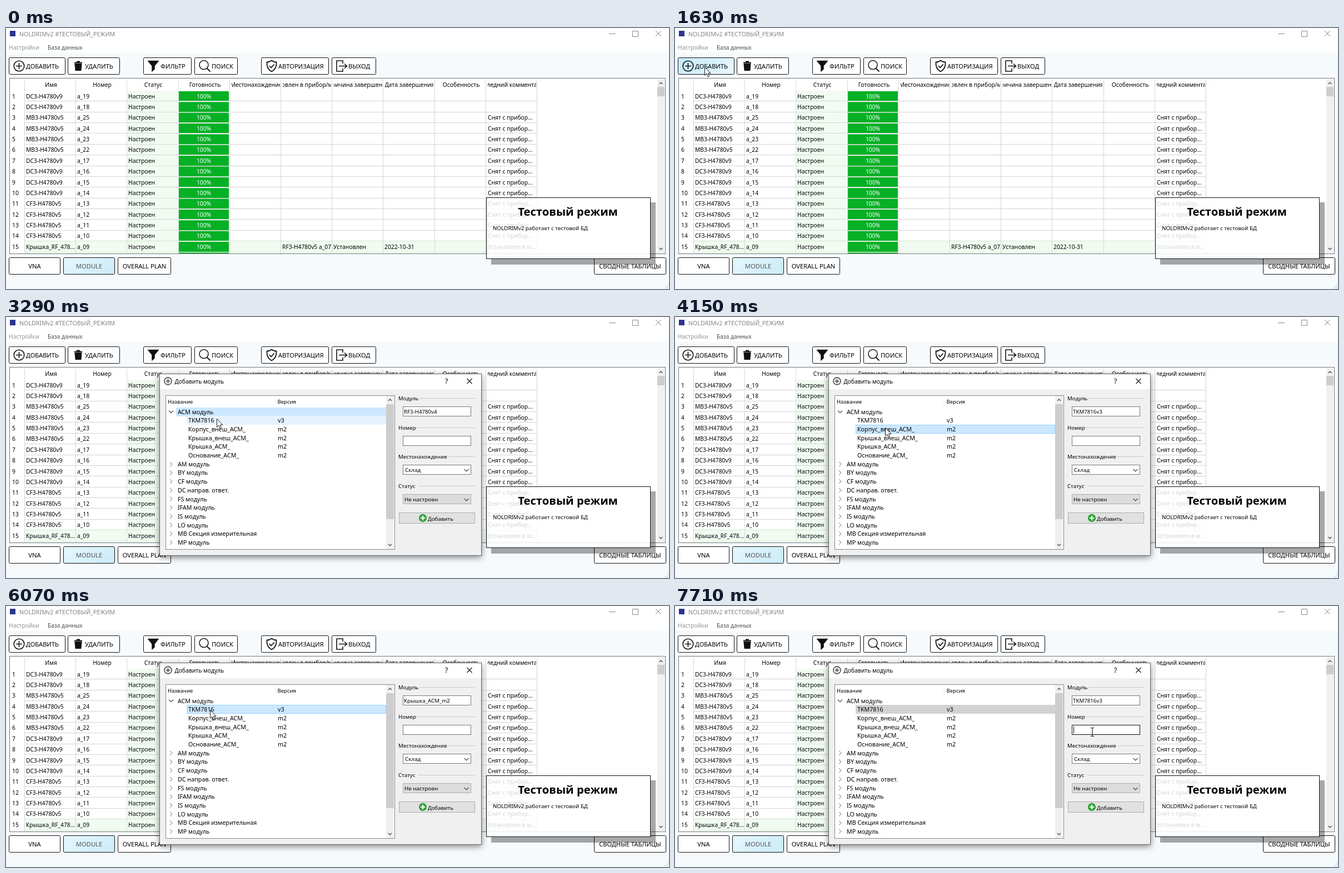
An HTML page that plays this animation: 1193x470 px, repeating every 8000 ms.

```html
<!DOCTYPE html>
<html lang="ru">
<head>
<meta charset="utf-8">
<title>Добавить модуль</title>
<style>
html, body { margin: 0; width: 100%; height: 100%; overflow: hidden; background: #fff; }
svg.stage { display: block; width: 1193px; height: 470px; font-family: "Noto Sans", "Open Sans", sans-serif; white-space: pre; cursor: default; }
.dialog { filter: drop-shadow(0 3px 6px #0007); }
</style>
</head>
<body>
<svg class="stage" viewBox="0 0 1193 470">
  <defs>
    <linearGradient id="glow" x2="1" y2=".4"><stop stop-color="#c3e9f8"/><stop offset="1" stop-color="#e3f6fd"/></linearGradient>
    <linearGradient id="tab" x2="1" y2=".4"><stop stop-color="#e6f8fd"/><stop offset="1" stop-color="#cfedf9"/></linearGradient>
    <clipPath id="table"><rect x="6" y="91" width="1181" height="315"/></clipPath>
    <clipPath id="tree"><rect x="288" y="142" width="411" height="276"/></clipPath>
  </defs>
  <g id="window"></g>
  <g id="hover"></g>
  <g id="notice"></g>
  <g id="dialog"></g>
  <g id="pointer"></g>
</svg>
<script>
const LOOP = 8000, APP = 'NOLDRIMv2';
const layer = id => document.getElementById(id);
const text = (x, y, s, size = 10.3, fill = '#000', more = '') =>
  `<text x="${x}" y="${y}" font-size="${size}" fill="${fill}" ${more}>${s}</text>`;
const centered = (x, y, s, size, fill, more = '') => text(x, y, s, size, fill, 'text-anchor="middle" ' + more);
const box = (x, y, w, h, fill, stroke = 'none', more = '') =>
  `<rect x="${x}" y="${y}" width="${w}" height="${h}" fill="${fill}" stroke="${stroke}" ${more}/>`;
const line = (d, stroke = '#000', width = 1, fill = 'none', more = '') =>
  `<path d="${d}" stroke="${stroke}" stroke-width="${width}" fill="${fill}" ${more}/>`;
const button = (x, y, w, fill = '#fff') => box(x + .5, y + .5, w, 30, fill, '#111', 'rx="2"');

function scrollbar(x, w, top, bottom, thumbTop, thumbBottom) {
  const c = x + w / 2;
  return box(x, top, w, bottom - top, '#f0f0f0')
    + box(x, thumbTop, w, thumbBottom - thumbTop, '#cdcdcd')
    + line(`M${c - 3} ${top + 9}l3 -3 3 3M${c - 3} ${bottom - 9}l3 3 3 -3`, '#505050', 1.4);
}

// ---- main window ----
const colX = i => Math.round(33 + 92.2 * i) + .5;
const rowY = i => 113 + 19.37 * i;

function tableRows() {
  const groups = [['DC3-H4780v9', 2, 19], ['MB3-H4780v5', 4, 25], ['DC3-H4780v9', 4, 17], ['CF3-H4780v5', 4, 13]];
  const rows = groups.flatMap(([name, n, first]) => Array.from({ length: n }, (_, i) => [name, 'a_' + (first - i)]));
  rows.push(['Крышка_RF_478...', 'a_09'], ['', '']);
  let s = '';
  rows.forEach(([name, number], i) => {
    const y = rowY(i), base = y + 13.6, tinted = i >= 14;
    s += box(tinted ? 33 : 218, y, tinted ? 922 : 91, 19.4, '#f1fbf1');
    s += box(310, y + .8, 91, 18, '#06b025');
    s += line(`M33 ${Math.round(y + 19.37) - .5}H955`, i >= 13 ? '#cfe6cf' : '#d3d3d3');
    if (!name) return;
    s += text(11, base, i + 1) + text(36, base, name) + text(128, base, number) + text(220, base, 'Настроен');
    s += centered(356, base, '100%', 10.3, '#fff');
    if (i > 1) s += text(867, base, i < 14 ? 'Снят с прибор...' : 'Установлен в м...');
  });
  const base = rowY(14) + 13.6;
  return s + text(497, base, 'RF3-H4780v5 a_07') + text(589, base, 'Установлен') + text(681, base, '2022-10-31');
}

function tableHeader() {
  const titles = ['Имя', 'Номер', 'Статус', 'Готовность', 'Местонахождение', 'Установлен в прибор/модуль',
    'Причина завершения', 'Дата завершения', 'Особенность', 'Последний комментарий'];
  return titles.map((s, i) => `<svg x="${colX(i) + 3.5}" y="92" width="87" height="20">${centered(44, 14, s)}</svg>`).join('')
    + titles.concat('').map((_, i) => line(`M${colX(i)} 94V406`, i == 2 || i == 3 ? '#cfe3cf' : '#d6d6d6')).join('');
}

function drawWindow() {
  let s = box(0, 0, 1193, 470, '#fff') + box(0, 44, 1193, 426, '#f6fafd');
  s += box(7, 5, 10, 10, '#2a3390') + text(24, 14.5, APP + ' #ТЕСТОВЫЙ_РЕЖИМ', 10.7, '#858585');
  s += line('M1085 10.5h12M1127.5 5.5h10v10h-10zM1169 5l10 10m0 -10l-10 10', '#888');
  s += text(5, 38.5, 'Настройки', 10.3, '#929292') + text(75, 38.5, 'База данных', 10.1, '#4c4c4c');

  [[5, 101, 36, 'ДОБАВИТЬ'], [111, 93, 142, 'УДАЛИТЬ'], [247, 86, 278, 'ФИЛЬТР'], [339, 77, 370, 'ПОИСК'],
   [459, 121, 490, 'АВТОРИЗАЦИЯ'], [586, 79, 616, 'ВЫХОД']].forEach(([x, w, tx, label], i) => {
    s += button(x, 53, w, '#fff').replace('<rect', i ? '<rect' : '<rect id="add"') + text(tx, 72.8, label, 11.1);
  });
  s += '<circle cx="23.5" cy="68.5" r="9.3" fill="none" stroke="#111" stroke-width="1.6"/>' + line('M18 68.5h11M23.5 63v11', '#111', 1.6);
  s += line('M123 62.5h14M127 60.5h6M124.5 65h11l-1 11h-9z', '#111', 2, '#111');
  s += line('M256 59.5h18l-7 8.5v6l-4 3.5v-9.5z', '#111', 1.5, '#111');
  s += '<circle cx="356" cy="66.5" r="8" fill="none" stroke="#111" stroke-width="1.5"/>' + line('M361.5 72.5l6 6', '#111', 1.8);
  s += line('M478 58.5q4 3 8.5 3q1 12 -8.5 17q-9.5 -5 -8.5 -17q4.5 0 8.5 -3zM474 68l3 3.5 5.5 -6', '#111', 1.8);
  s += line('M606 64v-5h-11v19h11v-5M599 68.5h14M609 64.5l4.5 4 -4.5 4', '#111', 1.6);

  s += box(6.5, 90.5, 1180, 316, '#fff', '#777');
  s += `<g clip-path="url(#table)">${tableRows()}${tableHeader()}</g>` + scrollbar(1172, 13, 92, 405, 106, 123);

  [[5, 92, 'VNA'], [103, 92, 'MODULE'], [201, 95, 'OVERALL PLAN'], [1058, 129, 'СВОДНЫЕ ТАБЛИЦЫ']].forEach(([x, w, label], i) => {
    s += button(x, 413, w, i == 1 ? 'url(#tab)' : '#fff') + centered(x + w / 2 + .5, 433, label, 11.2, i == 1 ? '#555' : '#000');
  });
  return s + line('M1186 468h6M1189 465h3M1191 462h1', '#b5b5b5', 1.5, 'none', 'stroke-dasharray="1.5 1.5"');
}

function drawNotice() {
  return line('M1160 314H1169V426H873V416H1160z', 'none', 0, '#000', 'fill-opacity=".34"')
    + box(864.5, 305.5, 295, 110, '#fff', 'none', 'fill-opacity=".84"') + box(864.5, 305.5, 295, 110, 'none', '#111')
    + centered(1011, 338, 'Тестовый режим', 20.2, '#000', 'font-weight="700"')
    + text(876, 363.5, APP + ' работает с тестовой БД', 9.8);
}

// ---- dialog ----
const modules = ['ACM модуль', 'AM модуль', 'BY модуль', 'CF модуль', 'DC направ. ответ.', 'FS модуль', 'IFAM модуль',
  'IS модуль', 'LO модуль', 'MB Секция измерительная', 'MP модуль', 'MS модуль', 'RF модуль', 'Шаблон'].map(name => ({ name }));
const parts = [['TKM7816', 'v3'], ['Корпус_внеш_ACM_', 'm2'], ['Крышка_внеш_ACM_', 'm2'], ['Крышка_ACM_', 'm2'], ['Основание_ACM_', 'm2']]
  .map(([name, version]) => ({ name, version }));
const openTree = [modules[0], ...parts, ...modules.slice(1)];
const ROW = 15.7, FIRST = 170.6;

// value of the last [time, value] entry already reached
const at = (track, t) => track.reduce((v, [when, next]) => t >= when ? next : v, null);
const DIALOG_OPEN = 1730, TREE_CLICK = 2700, TREE_OPEN = 2900, NUMBER_CLICK = 7520;
const selection = [[0, modules[12]], [TREE_CLICK, modules[0]], [3380, parts[0]], [4150, parts[1]], [4625, parts[2]], [5095, parts[3]], [6070, parts[0]]];
const chosen = [[0, 'RF3-H4780v4'], ...[[3670, 0], [4435, 1], [4910, 2], [5380, 3], [6260, 0]].map(([when, i]) => [when, parts[i].name + parts[i].version])];

function drawTree(t, [px, py]) {
  const open = t >= TREE_OPEN, right = open ? 684 : 699, versionX = open ? 488.5 : 496.5;
  const focused = t >= TREE_CLICK && t < NUMBER_CLICK, selected = at(selection, t);
  const hovered = px > 306 && px < right && py > 162 ? Math.round((py - FIRST) / ROW) : -1;
  let s = text(291, 156, 'Название', 9.5) + text(versionX, 156, 'Версия', 9.5) + line(`M${versionX - 4.5} 142v18`, '#ececec');
  (open ? openTree : modules).forEach((item, i) => {
    const y = FIRST + ROW * i, left = item.version ? 325 : 306, on = item === selected, over = i === hovered;
    if (on || over) {
      const fill = on ? (focused ? '#cce8ff' : '#d2d2d2') : '#e5f3ff';
      s += box(left + .5, Math.round(y - 8) + .5, right - left - 1, 15, fill, on && over && focused ? '#99d1ff' : fill);
    }
    s += text(item.version ? 328 : 309, y + 3.9, item.name, 10.7);
    if (item.version) s += text(489, y + 3.9, item.version, 10.7);
    else s += open && !i ? line(`M293 ${y - 2}l4 4 4 -4`, '#404040', 1.3) : line(`M295 ${y - 4}l4 4 -4 4`, '#a0a0a0', 1.2);
  });
  if (open) s += scrollbar(684, 14, 142, 418, 157, 364);
  return `<g clip-path="url(#tree)">${s}</g>`;
}

function drawDialog(t, pointer) {
  if (t < DIALOG_OPEN) return '';
  const typing = t >= NUMBER_CLICK;
  let s = `<g class="dialog">${box(276.5, 102.5, 579, 327, '#f0f0f0', '#666')}</g>` + box(277, 103, 578, 27, '#fff');
  s += '<circle cx="291.5" cy="115.5" r="6.6" fill="none" stroke="#111" stroke-width="1.2"/>' + line('M287.5 115.5h8M291.5 111.5v8', '#111', 1.2);
  s += text(303.5, 120, 'Добавить модуль', 10.3) + centered(792.5, 120, '?', 13) + line('M829.5 111l9 9m0 -9l-9 9', '#111', 1.1);
  s += box(287.5, 141.5, 412, 277, '#fff', '#828790') + drawTree(t, pointer);

  [['Модуль', 744], ['Номер', 737], ['Местонахождение', 796], ['Статус', 742]].forEach(([label, x], i) => {
    const y = 146.5 + Math.round(52.6 * i);
    s += text(706, y + 3.5, label, 9.7) + line(`M${x} ${y}H844`, '#c8c8c8');
  });
  s += box(714.5, 161.5, 122, 17, '#fff', '#7a7a7a') + text(716, 174, at(chosen, t), 9.7);
  s += box(714.5, 214.5, 122, 17, '#fff', t < TREE_CLICK ? '#0078d7' : typing ? '#111' : '#7a7a7a');
  if (typing) s += line('M717.5 216.5v13');
  s += box(714.5, 266.5, 122, 17, '#fff', '#7a7a7a') + text(718, 279.3, 'Склад', 9.8);
  s += box(714.5, 319.5, 122, 17, '#dcdcdc', '#adadad') + text(717, 332.3, 'Не настроен', 9.8);
  s += line('M824.5 274l4 4 4 -4M824.5 327l4 4 4 -4', '#444', 1.1);
  s += box(707.5, 352.5, 136, 19, '#e1e1e1', '#adadad') + '<circle cx="750" cy="362" r="7.2" fill="#35a53b"/>';
  return s + line('M746 362h8M750 358v8', '#fff', 2.2) + text(759, 366.5, 'Добавить', 9.7);
}

// ---- pointer ----
// first step, last step, number of steps, end x, end y
const moves = [
  [100, 100, 1, 734, 391], [190, 190, 1, 430, 348], [400, 1160, 9, 53, 70], [2015, 2110, 2, 121, 66],
  [2210, 2210, 1, 230, 78], [2307, 2990, 8, 374, 168], [3100, 3290, 3, 379, 183], [3850, 3950, 2, 378, 199],
  [4435, 4530, 2, 378, 217], [5000, 5000, 1, 378, 232], [5570, 5870, 4, 367, 187],
  [6650, 6842, 3, 400, 168], [6938, 7420, 6, 751, 223], [7520, 7710, 3, 751, 227]];

function pointerAt(t) {
  let x = -50, y = -50;
  for (const [first, last, n, endX, endY] of moves) {
    if (t < first) break;
    const step = n > 1 ? Math.min(n, 1 + Math.floor((t - first) / (last - first) * (n - 1) + 1e-6)) : 1;
    const u = step / n, k = n > 5 ? u * u * (3 - 2 * u) : u;
    x += (endX - x) * k;
    y += (endY - y) * k;
  }
  return [x, y];
}

function drawPointer([x, y]) {
  const beam = x > 714 && x < 837 && y > 214 && y < 232;
  return `<g transform="translate(${x.toFixed(1)} ${y.toFixed(1)})">` + (beam
    ? line('M-3 -7.5h2.5l.5 .5 .5 -.5h2.5M-3 7.5h2.5l.5 -.5 .5 .5h2.5M0 -7v14')
    : line('M.5 .5V15.3L3.9 12.2 6.2 17.8 8.6 16.8 6.3 11.3H11z', '#000', .9, '#fff')) + '</g>';
}

// ---- playback ----
const shown = {};
function put(id, markup) {
  if (shown[id] !== markup) layer(id).innerHTML = shown[id] = markup;
}

function frame() {
  const t = performance.now() % LOOP, pointer = pointerAt(t), [x, y] = pointer;
  const overAdd = t < DIALOG_OPEN && x > 5 && x < 106 && y > 53 && y < 84;
  layer('add').setAttribute('fill', overAdd ? 'url(#glow)' : '#fff');
  put('hover', t >= 190 && t < 400 ? box(403, 346, 90, 18, '#e5f3ff') : '');
  put('dialog', drawDialog(t, pointer));
  put('pointer', drawPointer(pointer));
  requestAnimationFrame(frame);
}

put('window', drawWindow());
put('notice', drawNotice());
frame();
</script>
</body>
</html>
```
